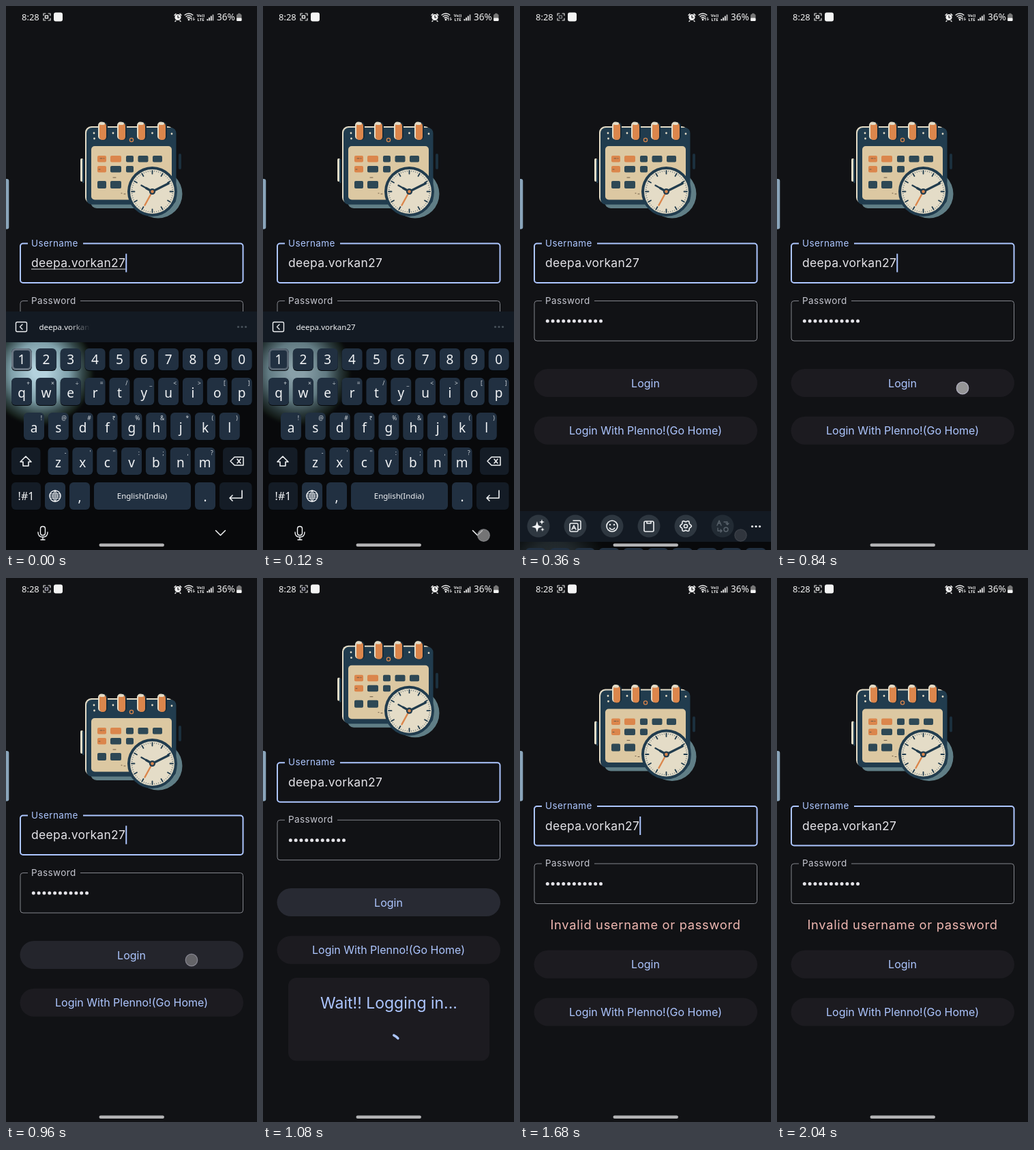
Write an HTML page with a canvas that moves like this. It is 368 px wide and 796 px high and loops after 2160 ms.

```html
<!DOCTYPE html>
<html lang="en">
<head>
<meta charset="utf-8">
<title>Login screen</title>
<style>
html, body { margin: 0; width: 100%; height: 100%; overflow: hidden; background: #111215; }
canvas { display: block; width: 368px; height: 796px; }
</style>
</head>
<body>
<canvas id="stage"></canvas>
<script>
const W = 368, H = 796, LOOP = 2160, STEP = 120;
const USER = "deepa.vorkan27";
const BG = "#111215", BLUE = "#adc6ff", PLATE = "#1c1b20";
const NAVY = "#213c4e", CREAM = "#e4dcc7", ORANGE = "#db864c", SAND = "#dcc8a2", TEAL = "#607e86";
const UI = "Inter, 'Open Sans', sans-serif", KEYS = "'Noto Sans', 'Open Sans', sans-serif";

const cv = document.getElementById("stage");
const c = cv.getContext("2d");
const dpr = window.devicePixelRatio || 1;
cv.width = W * dpr;
cv.height = H * dpr;

function box(x, y, w, h, r, fill) {
  c.beginPath();
  c.roundRect(x, y, w, h, r);
  c.fillStyle = fill;
  c.fill();
}

function disc(x, y, r, fill) {
  c.beginPath();
  c.arc(x, y, r, 0, 7);
  c.fillStyle = fill;
  c.fill();
}

function ring(x, y, r, color, width, from = 0, to = 2 * Math.PI) {
  c.beginPath();
  c.arc(x, y, r, from, to);
  c.strokeStyle = color;
  c.lineWidth = width;
  c.stroke();
}

function path(d, color, width, x = 0, y = 0) {
  c.save();
  c.translate(x, y);
  c.strokeStyle = color;
  c.lineWidth = width;
  c.lineCap = c.lineJoin = "round";
  c.stroke(new Path2D(d));
  c.restore();
}

// y is the baseline; returns the drawn width
function text(s, x, y, size, color, { font = UI, align = "left", gap = 0, weight = 400 } = {}) {
  c.font = `${weight} ${size}px ${font}`;
  c.letterSpacing = gap + "px";
  c.textAlign = align;
  c.fillStyle = color;
  c.fillText(s, x, y);
  return c.measureText(s).width;
}

function statusBar() {
  const o = { font: KEYS };
  text("8:28", 23, 21, 13, "#f2f2f2", o);
  path("M-5-2V-5H-2M2-5H5V-2M5 2V5H2M-2 5H-5V2", "#ddd", 1.2, 60, 16);
  c.strokeRect(57.5, 14.2, 4, 3.6);
  box(70, 9.5, 13, 13, 3, "#f4f4f4");
  // alarm
  disc(252, 16.5, 4.6, "#f0f0f0");
  path("M-5-3L-3-5M5-3L3-5M-3 5L-4 6M3 5L4 6", "#f0f0f0", 1.4, 252, 16.5);
  path("M0-2.5V.5H2", BG, 1.1, 252, 16.5);
  // wifi
  for (const r of [3.5, 6.5, 9.5]) ring(268, 20.5, r, "#eee", 1.4, -2.3, -0.84);
  disc(268, 20, 1.4, "#eee");
  path("M0 4V0L-1.5 1.5M3 0V4L4.5 2.5", "#eee", 1, 272, 17);
  text("Vo))", 285.5, 15.5, 6, "#eee", { ...o, align: "center", weight: 700 });
  text("LTE", 285.5, 22, 6, "#eee", { ...o, align: "center", weight: 700 });
  for (let i = 0; i < 4; i++) box(294.5 + i * 2.7, 19 - i * 2.2, 1.8, 2.5 + i * 2.2, 0.4, i < 3 ? "#eee" : "#bbb");
  text("36%", 309, 21, 13.5, "#f2f2f2", o);
  box(338, 12, 7.5, 10, 1.5, "#777");
  box(340, 10.8, 3.5, 2, 0.5, "#777");
  box(338, 17.5, 7.5, 4.5, 1.2, "#f4f4f4");
}

function calendar(dy) {
  c.save();
  c.translate(0, dy);
  box(124, 270, 90, 26, 9, TEAL);
  disc(223, 275, 35.5, TEAL);
  box(109, 223, 4, 34, 2, CREAM);
  box(112, 224, 2.5, 35, 1, NAVY);
  box(253, 216, 4, 23, 2, "#1b303e");
  box(116, 176, 130, 113, 9, CREAM);
  box(118, 178, 131.5, 112.5, 8, NAVY);
  box(125, 205, 118, 78.5, 5, SAND);
  for (const x of [141, 169, 198, 228]) {
    box(x - 5, 169.5, 13, 27, 6, "#182b38");
    box(x - 6, 169.5, 10, 26, 5, CREAM);
    box(x - 4, 171, 10, 25, 4.5, ORANGE);
    box(x - 4, 170, 8, 4, 2, CREAM);
  }
  for (const [x, y] of [[129, 186], [129.5, 194], [157, 186], [214.5, 186], [243, 187]]) disc(x, y, 1.4, CREAM);
  ring(184, 196, 2.6, ORANGE, 1.3);
  const cols = [[134, 13], [153, 16], [176, 11], [193.5, 15], [215, 14]];
  [[219, 5, 2], [234, 3, 1], [256, 2, 0]].forEach(([y, n, warm]) => {
    cols.slice(0, n).forEach(([x, w], i) => box(x, y, w, y > 250 ? 11 : 9.5, 2, i < warm ? ORANGE : "#2e4855"));
  });
  path("M157 251H161M138 223H141M143 223H144M136 239H138M169 274H170M173 275H175", "#6c5a45", 1);
  // clock
  disc(214.5, 271.5, 36.5, NAVY);
  disc(214.5, 271.5, 32.5, CREAM);
  for (let i = 0; i < 60; i++) {
    const a = i * Math.PI / 30, big = i % 5 === 0, r = big ? 26 : 29.5;
    const u = Math.cos(a), v = Math.sin(a);
    path(`M${u * r} ${v * r}L${u * 30.5} ${v * 30.5}`, NAVY, big ? 1.8 : 0.6, 214.5, 271.5);
  }
  path("M0 0L-11 20", ORANGE, 2.4, 214.5, 271.5);
  path("M0 0L-16-9", NAVY, 2.4, 214.5, 271.5);
  path("M0 0L-9-5M0 0L24-12", NAVY, 3.2, 214.5, 271.5);
  disc(214.5, 271.5, 4.6, NAVY);
  disc(214.5, 271.5, 2.3, ORANGE);
  c.restore();
}

function field(y, h, label, gapEnd, color, labelColor, width) {
  c.beginPath();
  c.roundRect(21, y, 326.5, h, 4);
  c.strokeStyle = color;
  c.lineWidth = width;
  c.stroke();
  c.fillStyle = BG;
  c.fillRect(32, y - 3, gapEnd - 32, 6);
  text(label, 37, y + 4, 13.5, labelColor, { gap: 0.4 });
}

function button(y, label, fill) {
  box(20.5, y - 20.5, 327.5, 41, 20.5, fill);
  text(label, 184, y + 6, 16, BLUE, { align: "center" });
}

function form(s) {
  calendar(s.top);
  c.save();
  c.translate(0, s.top);
  field(347.5, 57.5, "Username", 113, BLUE, BLUE, 2);
  const w = text(USER, 37, 382, 17.5, "#e4e3e8", { gap: 0.3 });
  if (s.typing) box(37, 384.5, w, 1, 0, "#d8d8dc");
  if (s.cursor) box(37 + w, 362.5, 2, 27, 0, BLUE);
  field(431.5, 58.5, "Password", 109, "#83858c", "#c6c7d0", 1);
  for (let i = 0; i < 11; i++) disc(40.3 + i * 7.82, 461, 2.5, "#e4e3e8");
  c.restore();
  button(551.5 + s.low, "Login", s.login);
  button(621.3 + s.low, "Login With Plenno!(Go Home)", PLATE);
  if (s.error) text("Invalid username or password", 184, 513.5, 18.3, "#f0b8b2", { align: "center", gap: 0.7 });
  if (s.wait) {
    box(37, 585, 295, 121.5, 12, PLATE);
    text("Wait!! Logging in...", 184.5, 629.5, 23, BLUE, { align: "center" });
    c.lineCap = "round";
    ring(184.5, 685, 17.5, BLUE, 3.5, -1.14, -0.7);
    c.lineCap = "butt";
  }
}

function touch(x, y, alpha, edge) {
  c.globalAlpha = alpha;
  disc(x, y, 9, "#a3a3a3");
  ring(x, y, 8.8, edge, 1.2);
  c.globalAlpha = 1;
}

function key(x, y, w, h, label, mark, dark) {
  box(x, y + 1, w, h, 6, "#05080b");
  box(x, y, w, h, 6, dark ? "#141c26" : "#213041");
  const size = label.length > 2 ? 16 : 19;
  const base = h < 35 ? 7 : label === "," || label === "." ? 8 : label.length > 2 ? 6 : 8.5;
  text(label, x + w / 2, y + h / 2 + base, size, "#f1f3f5", { font: KEYS, align: "center" });
  if (mark) text(mark, x + w - 3, y + 10.5, 8.5, "#d5dade", { font: KEYS, align: "right" });
}

function keyRow(x, y, h, letters, marks = "") {
  [...letters].forEach((l, i) => key(x + i * 35.85, y, 30, h, l, marks[i]));
}

function toolbar() {
  for (let i = 0; i < 6; i++) disc(27 + i * 54, 469, 16.5, i < 5 ? "#2e3740" : "#222b34");
  const ink = "#f1f3f5", dim = "#59636c";
  const star = (x, y, r) => {
    c.beginPath();
    for (let i = 0; i < 8; i++) {
      const a = i * Math.PI / 4, q = i % 2 ? r * 0.35 : r;
      c.lineTo(x + q * Math.cos(a), y + q * Math.sin(a));
    }
    c.fillStyle = ink;
    c.fill();
  };
  star(25, 470, 8);
  star(32, 463, 4);
  star(33, 474, 3);
  path("M-3-8H6Q8-8 8-6V3Q8 5 6 5H5M-6-4H2Q4-4 4-2V6Q4 8 2 8H-6Q-8 8-8 6V-2Q-8-4-6-4ZM-5 5L-2-1L1 5M-4 3H0", ink, 1.5, 81, 469);
  ring(135, 469, 8, ink, 1.6);
  disc(132, 467, 1.2, ink);
  disc(138, 467, 1.2, ink);
  ring(135, 470, 4, ink, 1.5, 0.3, 2.84);
  path("M-5-7H5Q7-7 7-5V6Q7 8 5 8H-5Q-7 8-7 6V-5Q-7-7-5-7ZM-3-7V-4H3V-7", ink, 1.6, 189, 469);
  c.beginPath();
  for (let i = 0; i < 32; i++) {
    const a = i * Math.PI / 16, r = 7.3 + Math.cos(a * 6) * 1.1;
    c.lineTo(243 + r * Math.cos(a), 469 + r * Math.sin(a));
  }
  c.closePath();
  c.strokeStyle = ink;
  c.lineWidth = 1.6;
  c.stroke();
  ring(243, 469, 2.6, ink, 1.5);
  path("M-8-1L-5-8L-2-1M-7-4H-3M2-6H7V-2M5-4L7-2L9-4M-7 3V7H-1M-3 5L-1 7L-3 9", dim, 1.4, 297, 469);
  ring(302, 474, 3, dim, 1.4);
}

function keyboard(s) {
  c.save();
  c.translate(0, s.drop);
  c.fillStyle = "#08090b";
  c.fillRect(0, 447, W, H - 447);
  const g = c.createRadialGradient(50, 535, 10, 50, 535, 82);
  g.addColorStop(0, "#b4d2dd");
  g.addColorStop(0.45, "#7fa0aa");
  g.addColorStop(0.72, "#35494b");
  g.addColorStop(0.9, "#141d18");
  g.addColorStop(1, "rgba(8,9,11,0)");
  c.globalAlpha = s.glow;
  c.fillStyle = g;
  c.fillRect(0, 492, 150, 130);
  c.globalAlpha = 1;
  c.fillStyle = "#131a23";
  c.fillRect(0, 447, W, 45);
  if (s.tools) toolbar();
  else {
    path("M-6-7H6Q8-7 8-5V5Q8 7 6 7H-6Q-8 7-8 5V-5Q-8-7-6-7ZM1.5-3.5L-2 0L1.5 3.5", "#eef0f2", 1.4, 22.5, 469.5);
    let ink = "#f1f3f5";
    if (s.typing) {
      ink = c.createLinearGradient(92, 0, 124, 0);
      ink.addColorStop(0, "#f1f3f5");
      ink.addColorStop(1, "rgba(241,243,245,0)");
    }
    text(USER, 48.5, 474, 11.5, ink, { font: KEYS });
  }
  for (const x of [340.5, 346, 351.5]) disc(x, 469.5, 1.6, s.tools ? "#f1f3f5" : "#48515a");

  keyRow(8, 501, 32, "1234567890");
  if (s.glow > 0.3) {
    c.beginPath();
    c.roundRect(9.5, 502.5, 27, 29, 5);
    c.strokeStyle = `rgba(130,140,152,${s.glow * 0.75})`;
    c.lineWidth = 3;
    c.stroke();
  }
  keyRow(8, 544, 40, "qwertyuiop", "+×÷=/_<>[]");
  keyRow(26, 595, 40, "asdfghjkl", "!@#₹%&*()");
  keyRow(61.5, 646, 40, "zxcvbnm", "-'\":;,?");
  key(8, 646, 42.5, 40, "", "", true);
  key(318, 646, 42.5, 40, "", "", true);
  path("M0-8L8 0H4V6H-4V0H-8Z", "#f1f3f5", 1.6, 29, 667);
  path("M-4-6H9V6H-4L-10 0ZM0-3L5 3M5-3L0 3", "#f1f3f5", 1.5, 339, 666);
  key(8, 697, 43, 40, "!#1", "", true);
  key(57, 697, 30, 40, "");
  ring(72, 717, 8, "#f1f3f5", 1.4);
  path("M-8 0H8M0-8V8M0-8Q-7 0 0 8M0-8Q7 0 0 8M-7-3H7M-7 3H7", "#f1f3f5", 1, 72, 717);
  key(93, 697, 30, 40, ",");
  key(129, 697, 142, 40, "");
  text("English(India)", 199.5, 721, 11.5, "#f1f3f5", { font: KEYS, align: "center" });
  key(277, 697, 30, 40, ".");
  key(313, 697, 47.5, 40, "", "", true);
  path("M9-7V4H-9M-5 0L-9 4L-5 8", "#f1f3f5", 1.6, 337, 716);
  c.restore();

  if (!s.tools) {
    path("M-3.5-6Q-3.5-9.5 0-9.5Q3.5-9.5 3.5-6V0Q3.5 3.5 0 3.5Q-3.5 3.5-3.5 0ZM-7-1Q-7 6 0 6Q7 6 7-1M0 6V10M-3 10H3", "#f1f3f5", 1.4, 54, 771);
    if (s.drop === 0) path("M-7-3.5L0 3.5L7-3.5", "#f1f3f5", 1.5, 314.5, 771);
  }
}

function stateAt(t) {
  const n = Math.floor(t / STEP);
  const wait = n === 9, error = n > 9;
  return {
    typing: n === 0,
    cursor: n === 0 || (n >= 5 && n <= 8) || (n >= 13 && n <= 16),
    wait, error,
    top: wait ? -77.3 : error ? -13.5 : 0,
    low: wait ? -77 : error ? 13.8 : 0,
    login: { 8: "#24252c", 9: "#282a33", 10: "#232328", 11: "#1f1e23" }[n] || PLATE,
    keys: n < 4,
    tools: n === 3,
    drop: [0, 0, 18.8, 292][n] || 0,
    glow: [1, 0.75, 0.5, 0.2][n] || 0,
    hideTap: [0, 0.7, 0.75, 0.2][n] || 0,
    loginTap: { 7: 0.9, 8: 0.5 }[n] || 0
  };
}

function draw() {
  const s = stateAt(performance.now() % LOOP);
  c.setTransform(dpr, 0, 0, dpr, 0, 0);
  c.fillStyle = BG;
  c.fillRect(0, 0, W, H);
  statusBar();
  form(s);
  box(-4, 253, 8.3, 73.5, 3, "#8aa5bb");
  if (s.keys) keyboard(s);
  if (s.hideTap) touch(323.5, 774.5, s.hideTap, "#8b8d92");
  if (s.loginTap) touch(272, 559, s.loginTap, "#b9b7c8");
  box(136.5, 786.5, 95.5, 4.6, 2.3, "#b3b3b5");
  requestAnimationFrame(draw);
}
draw();
</script>
</body>
</html>
```
